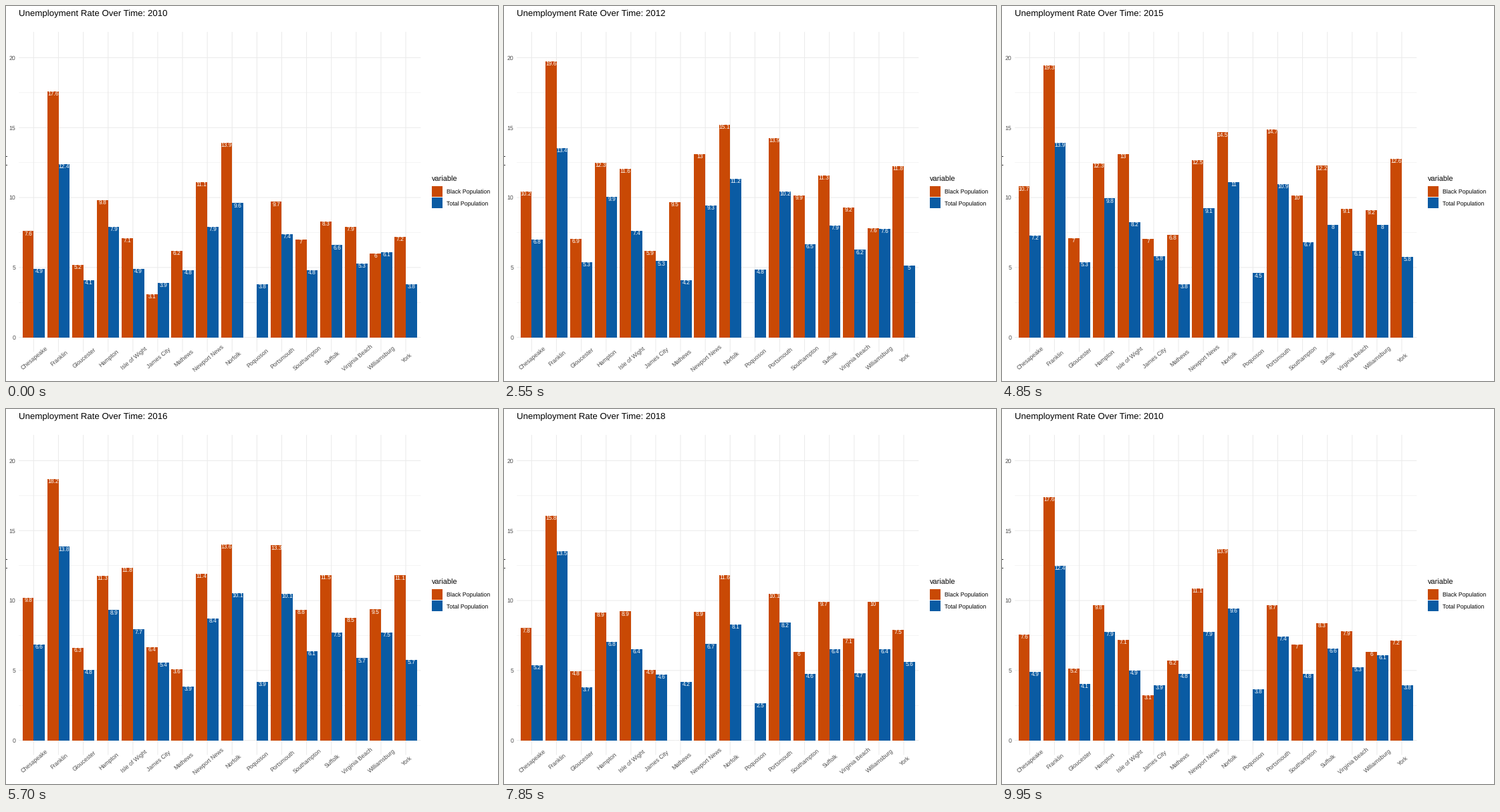
Animation, 736 px wide and 562 px high, one loop 10000 ms. Source, as a matplotlib script:

```python
import math

import matplotlib.pyplot as plt
from matplotlib.animation import FuncAnimation
from matplotlib.patches import Rectangle

plt.rcParams["font.family"] = "Liberation Sans"
plt.rcParams["text.hinting"] = "none"

W, H, DPI = 736, 562, 100
LEFT, RIGHT, TOP, BOTTOM = 19.14, 620.29, 38.9, 518.4
ZERO, UNIT = 496.65, 20.96             # pixel row of 0, pixels per percent
STEP = (RIGHT - LEFT) / 16.2           # distance between cities
BAR = 0.45 * STEP
ORANGE, BLUE = "#c94905", "#0a5ba3"
GRID, GREY = "#ebebeb", "#4d4d4d"
FIRST_YEAR, YEARS, FRAMES_PER_YEAR = 2010, 10, 20

# Per city, for the black and the total population:
# first rate, last rate, height of the swell between them
CITIES = {
    "Chesapeake": ((7.6, 7.2, 3.7), (4.9, 4.8, 2.7)),
    "Franklin": ((17.6, 15, 3.5), (12.4, 13.4, 1.1)),
    "Gloucester": ((5.2, 4.3, 2.6), (4.1, 3.3, 1.9)),
    "Hampton": ((9.8, 8.1, 3.9), (7.9, 6.1, 3.3)),
    "Isle of Wight": ((7.1, 8.2, 5.9), (4.9, 6.1, 3)),
    "James City": ((3.1, 4.6, 3.4), (3.9, 4.4, 1.8)),
    "Mathews": ((6.2, -6, 8.3), (4.8, 4.2, -0.7)),
    "Newport News": ((11.1, 8, 3.5), (7.9, 6.1, 2.5)),
    "Norfolk": ((13.9, 10.9, 2.6), (9.6, 7.4, 2.9)),
    "Poquoson": ((0, 0, 0), (3.8, 2, 1.9)),
    "Portsmouth": ((9.7, 9.2, 5.9), (7.4, 7.7, 3.7)),
    "Southampton": ((7, 5.1, 4.6), (4.8, 4.1, 2.6)),
    "Suffolk": ((8.3, 9.3, 3.8), (6.6, 6.1, 1.9)),
    "Virginia Beach": ((7.9, 6.7, 2.1), (5.3, 4.4, 1.5)),
    "Williamsburg": ((6, 10.3, 0.9), (6.1, 6.1, 2.1)),
    "York": ((7.2, 6.4, 6.6), (3.8, 5.6, 1.1)),
}


def rate(series, year):
    """Straight trend plus a swell that peaks in the fifth year."""
    first, last, swell = series
    t = year / (YEARS - 1)
    hump = max(0, math.sin(math.pi * t ** 0.8)) ** 1.5
    return round(max(0, first + (last - first) * t + swell * hump), 1)


fig = plt.figure(figsize=(W / DPI, H / DPI), dpi=DPI, facecolor="white")
ax = fig.add_axes([0, 0, 1, 1])
ax.set_xlim(0, W)
ax.set_ylim(H, 0)
ax.axis("off")


def pt(px):
    return px * 72 / DPI


def label(x, y, s, size, color="black", ha="left", **kw):
    return ax.text(x, y, s, fontsize=pt(size), color=color, ha=ha,
                   va="baseline", **kw)


def line(xs, ys, width, color=GRID):
    ax.plot(xs, ys, color=color, lw=pt(width), solid_capstyle="butt",
            snap=False, zorder=1)


def rect(x, y, w, h, color):
    return ax.add_patch(Rectangle((x, y), w, h, facecolor=color, lw=0, zorder=2))


def row(value):
    return ZERO - UNIT * value


# Grid and axis labels
for v in range(0, 25, 5):
    if v < 20:
        line([LEFT, RIGHT], [row(v + 2.5)] * 2, 0.53)
    if v <= 20:
        line([LEFT, RIGHT], [row(v)] * 2, 1.07)
        label(14.2, row(v) + 3.3, str(v), 8.8, GREY, "right")

centres = [LEFT + STEP * (0.6 + i) for i in range(len(CITIES))]
for x, city in zip(centres, CITIES):
    line([x, x], [TOP, BOTTOM], 1.07)
    label(x + 3.1, 529.8, city, 8.8, GREY, "center",
          rotation=40, rotation_mode="anchor")

# Visible ends of the axis title, cut off at the left edge
for y in (225.5, 238.5):
    line([0, 2], [y, y], 1, "#333333")

# Legend
label(636.5, 263, "variable", 11)
for i, (color, name) in enumerate(((ORANGE, "Black Population"),
                                   (BLUE, "Total Population"))):
    y = 270 + 17.28 * i
    rect(637, y, 16, 16, color)
    label(659.2, y + 11.6, name, 8.8)

title = label(19, 15, "", 13.2)

bars, tags, rates = [], [], []
for x, pair in zip(centres, CITIES.values()):
    for left, color, series in zip((x - BAR, x), (ORANGE, BLUE), pair):
        bars.append(rect(left, ZERO, BAR, 0, color))
        tags.append(label(left + BAR / 2, ZERO, "", 8.53, "white", "center",
                          zorder=3))
        rates.append([rate(series, year) for year in range(YEARS)])


def progress(i):
    """Year index and linear share of the way to the next year."""
    k, j = divmod(i, FRAMES_PER_YEAR)
    hold = 7 if k == 0 else 8
    return k, max(0, j - hold + 1) / (FRAMES_PER_YEAR - hold + 1)


def update(i):
    k, p = progress(i)
    after = (k + 1) % YEARS
    nearest = k if p < 0.5 else after
    title.set_text(f"Unemployment Rate Over Time: {FIRST_YEAR + nearest}")
    for bar, tag, values in zip(bars, tags, rates):
        y = row(values[k] * (1 - p) + values[after] * p)
        bar.set_y(y)
        bar.set_height(ZERO - y)
        tag.set_y(y + 6.1)
        tag.set_text(f"{values[nearest]:g}")
    return [title, *bars, *tags]


anim = FuncAnimation(fig, update, frames=FRAMES_PER_YEAR * YEARS,
                     interval=50, repeat=True, repeat_delay=0)
plt.show()
```
